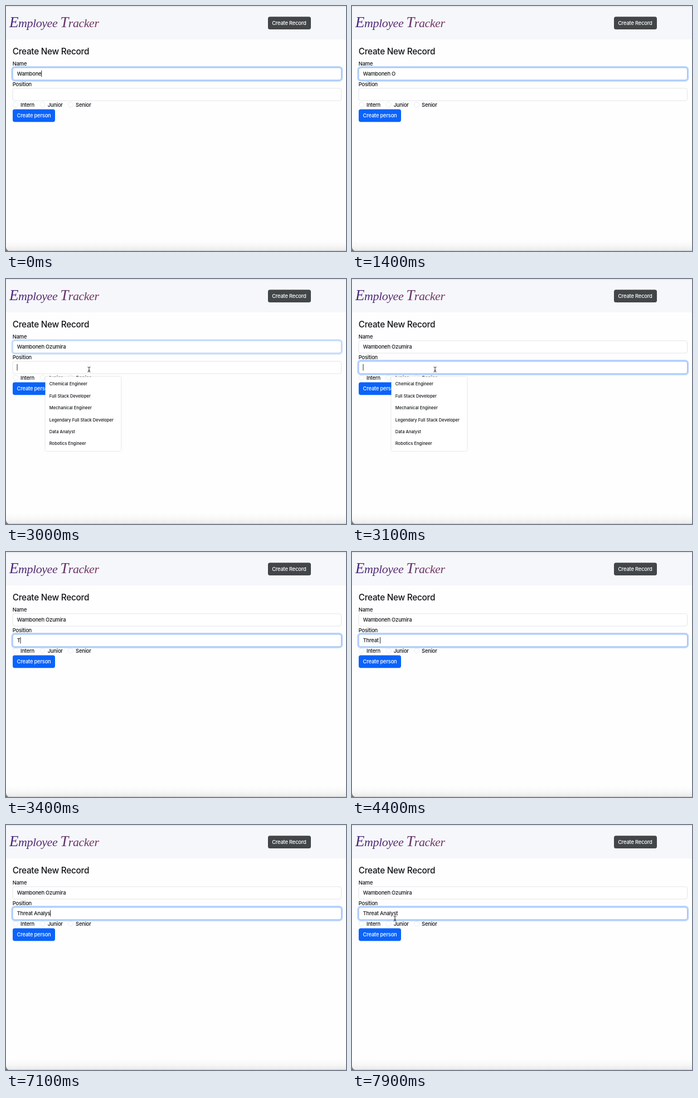
An HTML page for the animation above (8000 ms loop, 610 px wide and 440 px high).

```html
<!DOCTYPE html>
<html lang="en">
<head>
<meta charset="utf-8">
<title>Employee Tracker</title>
<style>
  html, body { margin: 0; width: 100%; height: 100%; overflow: hidden; background: #fefefe; }
  svg { display: block; width: 610px; height: 440px; }
  text { font: 450 9.4px Inter, "Open Sans", sans-serif; letter-spacing: -.022em; fill: #111417; white-space: pre; }
  .brand { font: italic 22px "Liberation Serif", serif; letter-spacing: -.45px; fill: url(#ink); }
  .cap { font-size: 27px; }
  .heading { font-size: 15.3px; font-weight: 500; letter-spacing: -.25px; }
  .light { fill: #fff; }
  .box { fill: #fff; stroke: #dee2e6; stroke-width: .9; }
  .glow { fill: none; stroke: #0d6efd; stroke-opacity: .28; stroke-width: 2.4; }
  .edge { fill: none; stroke: #86b7fe; stroke-width: .9; }
  .radio { fill: #fff; stroke: #e3e6e9; stroke-width: .8; }
  .caret { fill: #111; }
  #menu text { font-size: 7.6px; letter-spacing: 0; }
  #menu rect { fill: #fff; filter: drop-shadow(0 .8px .8px rgba(0, 0, 0, .2)); }
  #mouse path { fill: none; stroke-linecap: round; }
</style>
</head>
<body>
<svg viewBox="0 0 610 440">
  <defs>
    <linearGradient id="ink" gradientUnits="userSpaceOnUse" x1="6" y1="0" x2="166" y2="0">
      <stop stop-color="#46277c"/>
      <stop offset="1" stop-color="#78385f"/>
    </linearGradient>
    <linearGradient id="shade" x2="0" y2="1">
      <stop stop-color="#fefefe"/>
      <stop offset=".5" stop-color="#f8f8f8"/>
      <stop offset="1" stop-color="#e9e9e9"/>
    </linearGradient>
  </defs>

  <rect width="610" height="440" fill="#fefefe"/>
  <rect width="610" height="60" fill="#f6f7fb"/>
  <rect width="610" height="1.6" fill="#e4e7ea"/>
  <rect y="420" width="610" height="20" fill="url(#shade)"/>
  <path d="M0 433v7h7q-6 0-7-7z" fill="#777"/>
  <path d="M6.5 439.5H610" stroke="#c2c2c2" stroke-width=".8"/>

  <text class="brand" x="6" y="37.5"><tspan class="cap">E</tspan>mployee <tspan class="cap">T</tspan>racker</text>
  <rect x="470" y="19.3" width="77" height="22.8" rx="3.6" fill="#424649"/>
  <text class="light" x="477.2" y="34.2">Create Record</text>

  <text class="heading" x="11.7" y="87.3">Create New Record</text>
  <text x="11.8" y="107">Name</text>
  <text x="11.8" y="143.8">Position</text>

  <g id="radios"></g>
  <rect x="12" y="185.6" width="76" height="22.6" rx="3.6" fill="#0a63fb"/>
  <text class="light" x="19.6" y="200.4">Create person</text>

  <g id="name"></g>
  <g id="position"></g>

  <g id="menu"><rect x="70.5" y="175.5" width="135.7" height="133.3" rx="1.5"/></g>
  <g id="mouse">
    <path d="M-2.2-4.5Q0-4.5 0-3Q0-4.5 2.2-4.5M0-3V3M-2.2 4.5Q0 4.5 0 3Q0 4.5 2.2 4.5M-1.2 1.6H1.2" stroke="#222" stroke-width=".9"/>
  </g>
</svg>

<script>
const LOOP = 8000, STEP = 100;
const FULL_NAME = "Wamboneh Ozumira";
const $ = id => document.getElementById(id);
const clamp = v => Math.min(1, Math.max(0, v));

function add(parent, tag, attrs, content = "") {
  const el = document.createElementNS("http://www.w3.org/2000/svg", tag);
  for (const key in attrs) el.setAttribute(key, attrs[key]);
  el.textContent = content;
  return parent.appendChild(el);
}

function makeField(id, y) {
  const g = $(id);
  const rect = (cls, grow) => add(g, "rect", {
    class: cls, x: 12 - grow, y: y - grow, width: 589.6 + 2 * grow, height: 22.2 + 2 * grow, rx: 3.6 + grow
  });
  rect("box", 0);
  const ring = add(g, "g", {});
  ring.append(rect("glow", 1.5), rect("edge", 0));
  const label = add(g, "text", { x: 19.7, y: y + 14.3 });
  const caret = add(g, "rect", { class: "caret", y: y + 5, width: .9, height: 11.6 });
  return (value, caretOn, focus) => {
    label.textContent = value;
    caret.setAttribute("x", 19.6 + (value ? label.getComputedTextLength() : 0));
    caret.style.opacity = caretOn ? 1 : 0;
    ring.style.opacity = focus;
  };
}

const drawName = makeField("name", 110.8);
const drawPosition = makeField("position", 147.8);

[["Intern", 17], ["Junior", 65.6], ["Senior", 116]].forEach(([word, x]) => {
  add($("radios"), "circle", { class: "radio", cx: x, cy: 177.2, r: 4.5 });
  add($("radios"), "text", { x: x + 9.1, y: 180.6 }, word);
});

["Chemical Engineer", "Full Stack Developer", "Mechanical Engineer",
 "Legendary Full Stack Developer", "Data Analyst", "Robotics Engineer"]
  .forEach((job, i) => add($("menu"), "text", { x: 77.8, y: 191.2 + i * 21.45 }, job));

// [time, letters typed, caret hidden]
const nameKeys = [
  [0, 7], [100, 8], [500, 9], [900, 10], [1400, 10, 1], [1600, 11], [1800, 12],
  [2100, 13], [2300, 14], [2400, 15], [2500, 16], [3000, 16, 1]
];
// [time, text, caret hidden]
const jobKeys = [
  [0, "", 1], [3000, ""], [3400, "T"], [3700, "Th"], [3800, "Thr"], [3900, "Thre"],
  [4100, "Threat"], [4400, "Threat "], [4600, "Threat AN"], [5100, "Threat A"],
  [5200, "Threat AN"], [5700, "Threat AN", 1], [5800, "Threat A"], [6000, "Threat An"],
  [6100, "Threat Ana"], [6300, "Threat Anal"], [6800, "Threat Anal", 1],
  [7000, "Threat Analy"], [7100, "Threat Analys"], [7300, "Threat Analyst"],
  [7800, "Threat Analyst", 1]
];
// [time, x, y]; no place means hidden
const mouseKeys = [
  [0], [2700, 150, 130], [2800, 150, 149], [2900, 149, 160], [3000, 149, 162.5], [3400],
  [7500, 134, 164], [7600, 122, 166], [7700, 107, 167], [7800, 91, 168], [7900, 77, 168]
];
const at = (keys, t) => keys.findLast(key => key[0] <= t);

function draw(t) {
  const [, count, nameOff] = at(nameKeys, t);
  const [, job, jobOff] = at(jobKeys, t);
  const [, x, y] = at(mouseKeys, t);
  drawName(FULL_NAME.slice(0, count), !nameOff, 1 - clamp((t - 2960) / 120));
  drawPosition(job, !jobOff, clamp((t - 3000) / 100));
  $("menu").style.display = t >= 3000 && t < 3400 ? "" : "none";
  $("mouse").style.display = x ? "" : "none";
  if (x) $("mouse").setAttribute("transform", `translate(${x} ${y})`);
}

const start = performance.now();
function tick() {
  const t = (performance.now() - start) % LOOP;
  draw(Math.floor(t / STEP) * STEP);
  requestAnimationFrame(tick);
}
tick();
</script>
</body>
</html>
```
